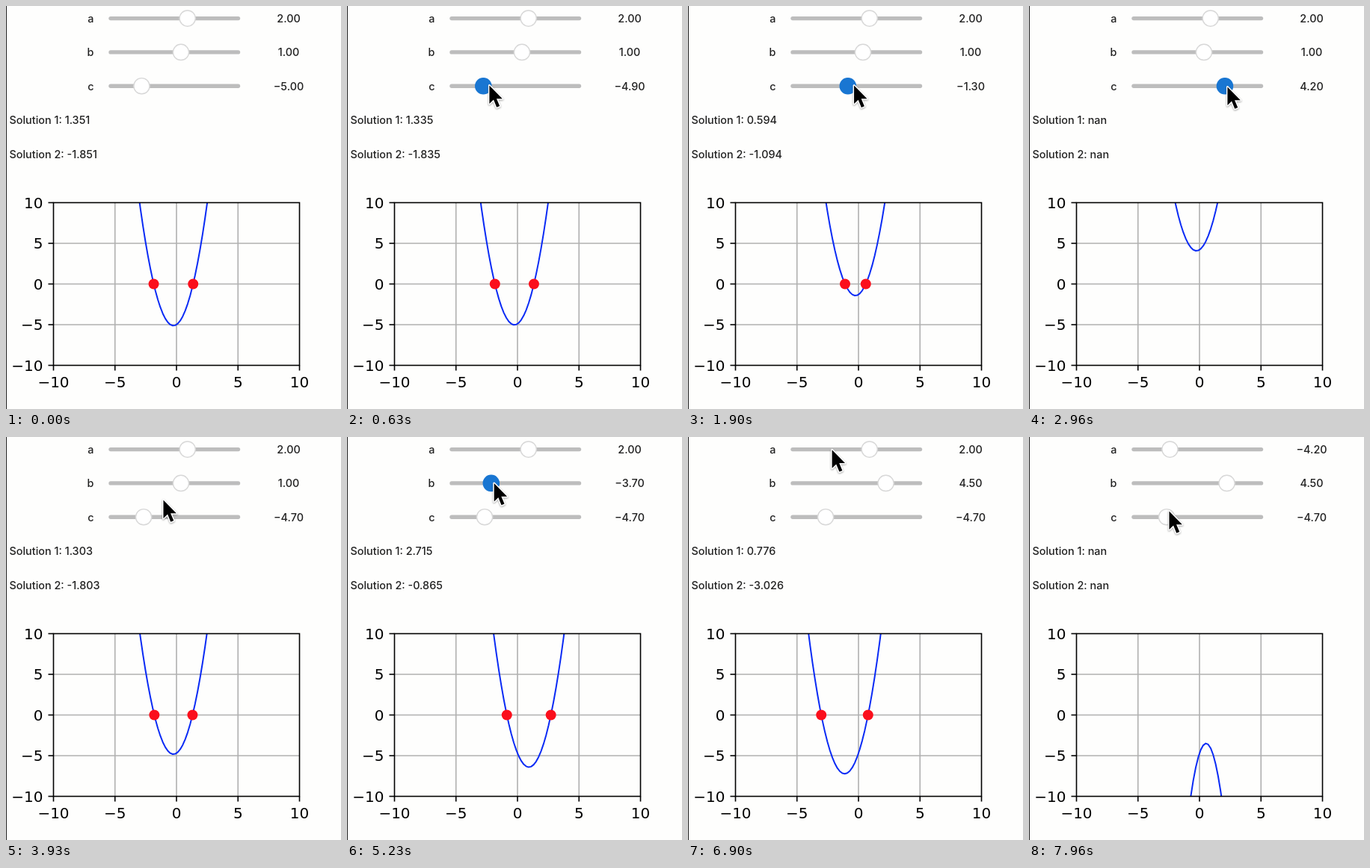
An HTML page for the animation above (8 s loop, 448x540 px).

```html
<!DOCTYPE html>
<html lang="en">
<head>
<meta charset="utf-8">
<title>Quadratic solver</title>
<style>
  html, body { margin: 0; width: 100%; height: 100%; overflow: hidden; background: #fefefd; }
  svg { display: block; width: 448px; height: 540px; }
  .ui { font: 500 14.4px Inter, "Open Sans", sans-serif; fill: #222; }
  .tick { font: 20px "DejaVu Sans", sans-serif; fill: #000; }
  .mid { text-anchor: middle; }
  .end { text-anchor: end; }
  .rail { stroke: #bdbdbd; stroke-width: 5.4; stroke-linecap: round; }
  .knob { fill: #fff; stroke: #d8d8d8; stroke-width: 1.4; }
  .knob.on { fill: #1976d2; stroke: #1976d2; }
  .grid { stroke: #b0b0b0; stroke-width: 1.6; }
  .axis { stroke: #000; stroke-width: 1.6; fill: none; }
  #curve { fill: none; stroke: #0a2bf5; stroke-width: 2; stroke-linejoin: round; }
  .dot { fill: #fb0f1c; }
  #cursor path { fill: #000; stroke: #fff; stroke-width: 3; paint-order: stroke; stroke-linejoin: round; }
  #cursor { filter: drop-shadow(0 1.5px 1.2px rgba(0, 0, 0, .35)); }
</style>
</head>
<body>
<svg viewBox="0 0 448 540">
  <defs><clipPath id="box"><rect x="63.5" y="263.5" width="329" height="218"/></clipPath></defs>
  <rect width="1" height="540" fill="#222"/>
  <g id="sliders"></g>
  <text class="ui" id="s1" x="4.5" y="158"></text>
  <text class="ui" id="s2" x="4.5" y="203.5"></text>
  <g id="axes"></g>
  <path id="curve" clip-path="url(#box)"/>
  <rect class="axis" x="63.5" y="263.5" width="329" height="218"/>
  <circle class="dot" id="d1" r="7"/>
  <circle class="dot" id="d2" r="7"/>
  <g id="cursor"><path d="M1.4 2.5V27L7 21.6 11.2 31.8 15.2 30.1 11 20.2H18.8Z"/></g>
</svg>
<script>
const LOOP = 8000;
const $ = id => document.getElementById(id);

function add(parent, tag, attrs, text = '') {
  const el = document.createElementNS('http://www.w3.org/2000/svg', tag);
  for (const k in attrs) el.setAttribute(k, attrs[k]);
  el.textContent = text;
  return parent.appendChild(el);
}

const mix = (a, b, u) => a + (b - a) * u;
const span = (t, from, to) => Math.min(1, Math.max(0, (t - from) / (to - from)));
const smooth = (t, from, to) => { const u = span(t, from, to); return u * u * (3 - 2 * u); };
const easeOut = (t, from, to) => 1 - (1 - span(t, from, to)) ** 2;

const round = v => Math.round(v * 10) / 10;
const minus = v => String(v).replace('-', '\u2212');
const px = x => 228 + x * 16.45;
const py = y => 372.5 - y * 10.9;
const knobX = v => 225.2 + v * 8.75;
const railY = i => 16.6 + i * 45.3;

// Slider c is dragged in four strokes, b is tapped then dragged, a is tapped
const dragC = t => -5 + 3.3 * smooth(t, 560, 1430) + 0.1 * smooth(t, 1510, 1600)
  + 5.8 * smooth(t, 1810, 2460) - 8.9 * smooth(t, 2930, 3660);
const dragB = t => mix(-3.7, 4.5, smooth(t, 5230, 5985));
const TAP_B = 4400, TAP_A = 7130, NEW_A = -4.2;

function cursorAt(t) {
  const slip = smooth(t, 1810, 2460);
  let x = 400, y = 103;
  const move = (from, to, toX, toY, bow = 0) => {
    const u = easeOut(t, from, to);
    x = mix(x, toX, u) + bow * Math.sin(Math.PI * u);
    y = mix(y, toY, u);
  };
  move(110, 360, knobX(dragC(t)) + mix(7, 2.5, slip), mix(104, 106, slip));
  move(3800, 4230, knobX(dragB(t)) + 2.5, 59.5, 18);
  move(6240, 6960, knobX(NEW_A) + 2, 14.5, 12);
  move(7710, 7960, knobX(dragC(t)) + 2, 97);
  return [x, y];
}

const sliders = ['a', 'b', 'c'].map((name, i) => {
  const y = railY(i), g = $('sliders');
  add(g, 'text', { class: 'ui end', x: 117.5, y: y + 5.4 }, name);
  add(g, 'line', { class: 'rail', x1: 140, x2: 310.5, y1: y, y2: y });
  const knob = add(g, 'circle', { class: 'knob', cy: y, r: 10.6 });
  const label = add(g, 'text', { class: 'ui mid', x: 378, y: y + 5.4 });
  return { y, knob, label };
});

for (let v = -10; v <= 10; v += 5) {
  const g = $('axes'), x = px(v), y = py(v);
  if (Math.abs(v) < 10) {
    add(g, 'line', { class: 'grid', x1: x, x2: x, y1: py(10), y2: py(-10) });
    add(g, 'line', { class: 'grid', x1: px(-10), x2: px(10), y1: y, y2: y });
  }
  add(g, 'line', { class: 'axis', x1: x, x2: x, y1: 481.5, y2: 488.5 });
  add(g, 'line', { class: 'axis', x1: 56.5, x2: 63.5, y1: y, y2: y });
  add(g, 'text', { class: 'tick mid', x, y: 510.5 }, minus(v));
  add(g, 'text', { class: 'tick end', x: 49.5, y: y + 7.3 }, minus(v));
}

function drawPlot(a, b, c) {
  const points = Array.from({ length: 100 }, (_, i) => {
    const x = mix(-10, 10, i / 99);
    return px(x).toFixed(2) + ' ' + py(a * x * x + b * x + c).toFixed(2);
  });
  $('curve').setAttribute('d', 'M' + points.join('L'));

  const root = Math.sqrt(b * b - 4 * a * c);
  [root, -root].forEach((r, i) => {
    const x = (r - b) / (2 * a), real = !isNaN(x), dot = $('d' + (i + 1));
    $('s' + (i + 1)).textContent = `Solution ${i + 1}: ${real ? x.toFixed(3) : 'nan'}`;
    dot.style.display = real ? '' : 'none';
    if (real) {
      dot.setAttribute('cx', px(x));
      dot.setAttribute('cy', py(0));
    }
  });
}

function draw(t) {
  const [x, y] = cursorAt(t), shown = t >= 130;
  $('cursor').style.display = shown ? '' : 'none';
  $('cursor').setAttribute('transform', `translate(${x} ${y})`);

  // A tap sets the value at once while the knob glides after it
  const b = round(dragB(t)), c = round(dragC(t));
  const values = [t < TAP_A ? 2 : NEW_A, t < TAP_B ? 1 : b, c];
  const knobs = [
    mix(2, NEW_A, smooth(t, TAP_A, TAP_A + 300)),
    mix(1, b, smooth(t, TAP_B, TAP_B + 300)),
    c
  ];
  const released = t >= 5985 && t < 6100;

  sliders.forEach((s, i) => {
    const kx = knobX(knobs[i]);
    s.knob.setAttribute('cx', kx);
    s.knob.classList.toggle('on', shown && !released && Math.hypot(x - kx, y - s.y) < 9.7);
    s.label.textContent = minus(values[i].toFixed(2));
  });
  drawPlot(...values);
}

const start = performance.now();
function frame() {
  draw((performance.now() - start) % LOOP);
  requestAnimationFrame(frame);
}
frame();
</script>
</body>
</html>
```
